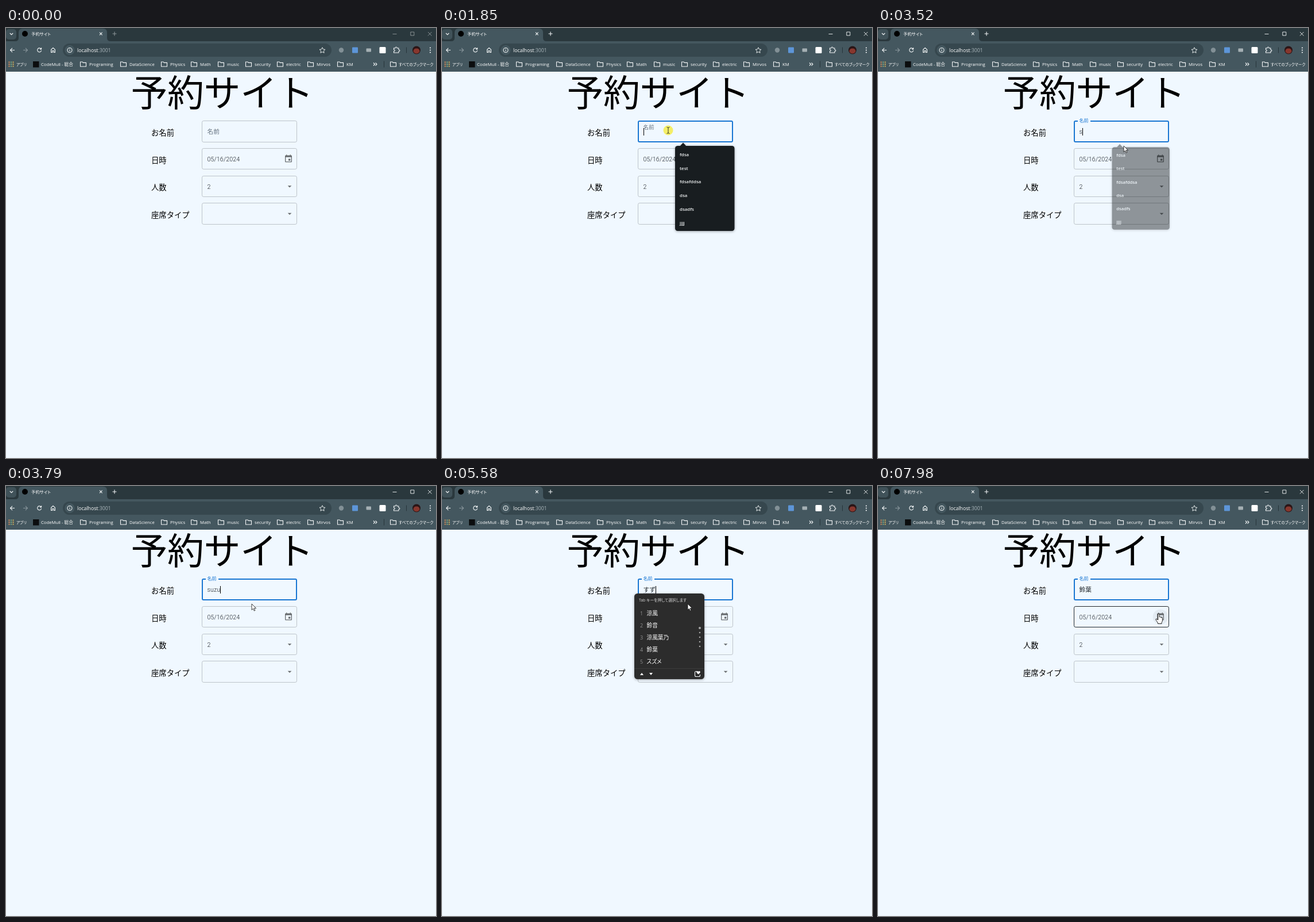
Write an HTML page that moves like this. It is 749 by 748 pixels and loops after 8 s.

```html
<!DOCTYPE html>
<html lang="ja">
<head>
<meta charset="utf-8">
<title>予約サイト</title>
<style>
html, body { margin: 0; width: 100%; height: 100%; overflow: hidden; background: #f0f8ff; }
svg { display: block; }
text { white-space: pre; font-family: "Open Sans", "Noto Sans CJK JP", "Noto Sans CJK", sans-serif; }
.bar { font-size: 7.7px; fill: #fff; font-feature-settings: "palt"; }
.jp { font-size: 6.7px; }
.icon { fill: none; stroke: #f3f6f7; stroke-width: 1.1; }
.dim { opacity: .4; }
.page { font-family: "Noto Sans CJK JP", "Noto Sans CJK", sans-serif; }
.heading { font-size: 64px; letter-spacing: -.5px; }
.caption { font-size: 13.33px; }
.value { font: 300 10.67px Roboto, "Noto Sans CJK JP", "Noto Sans CJK", sans-serif; letter-spacing: .1px; fill: #1c2227; }
.box { fill: none; stroke: #bdc4c9; }
.box.hover { stroke: #23282c; }
.focus { fill: none; stroke: #1976d2; stroke-width: 2; }
.grey { fill: #6a6e71; }
.suggest text { font-size: 7.9px; font-weight: 600; fill: #eef1f2; }
.suggest, .ime { filter: drop-shadow(0 1px 2px rgba(0, 0, 0, .35)); }
.suggest { transform-origin: 457.5px 279px; }
.ime text { font-size: 9.7px; fill: #fff; font-feature-settings: "palt"; }
.ime .hint { font-size: 6.85px; fill: #d8d8d8; }
.ime .num { fill: #8f8f8f; font-size: 9px; }
</style>
</head>
<body>
<svg id="stage" width="749" height="748" viewBox="0 0 749 748">
  <rect width="749" height="23" fill="#2a383d"/>
  <rect y="23" width="749" height="53" fill="#44575f"/>

  <!-- tab strip -->
  <rect x="0" y="2" width="18" height="18" rx="5" fill="#405259"/>
  <path class="icon" d="M6.8 9l2.7 2.7L12.2 9"/>
  <path d="M16 23q6 0 6-6V8q0-7 7-7H169q7 0 7 7v9q0 6 6 6z" fill="#44575f"/>
  <circle cx="33" cy="10" r="5" fill="#000"/>
  <text class="bar" x="44" y="13.2" style="font-size:7.4px">予約サイト</text>
  <path class="icon" d="M163 7.7l4.6 4.6m0-4.6l-4.6 4.6"/>
  <g id="controls" class="icon">
    <path d="M185.5 10h7M189 6.500v7"/>
    <path d="M673.5 10.5h7M704.8 7h6v6h-6zM735 7l6.5 6.5m0-6.5L735 13.5" stroke-width=".9"/>
  </g>

  <!-- toolbar -->
  <g class="icon">
    <path d="M15 38.5H7.5m3.6-3.6l-3.6 3.6 3.6 3.6"/>
    <path class="dim" d="M30 38.5h7.5m-3.6-3.6l3.6 3.6-3.6 3.6"/>
    <path d="M61 36.3a3.5 3.5 0 1 0 .6 2.7M61.6 34.3v2.6H59"/>
    <path d="M78.6 42.5v-5l3.4-3 3.4 3v5h-2.2v-3h-2.4v3z"/>
  </g>
  <rect x="99" y="27" width="468" height="23" rx="11.5" fill="#36474e"/>
  <circle cx="111" cy="38.5" r="8.5" fill="#44575f"/>
  <g class="icon">
    <circle cx="111" cy="38.5" r="4"/>
    <path d="M111 38v2.6m0-4.6v1.1"/>
    <path d="M551 33.8l1.5 3.2 3.5.4-2.6 2.4.7 3.5-3.1-1.8-3.1 1.8.7-3.5-2.6-2.4 3.5-.4z" stroke-width=".9"/>
    <path d="M675.5 35h2.6q0-2 1.5-2t1.5 2h2.8v2.8q2 0 2 1.5t-2 1.5V43h-8.4v-2.5q1.8 0 1.8-1.4t-1.8-1.4z"/>
  </g>
  <text class="bar" x="124" y="41.6" style="font-size:8.7px">localhost<tspan fill="#aebabf">:3001</tspan></text>
  <circle cx="584" cy="38.5" r="4.2" fill="#829096"/>
  <rect x="603" y="33.5" width="10" height="10" rx="1" fill="#5d95d8"/>
  <rect x="627.5" y="35.5" width="8.5" height="6" rx="1" fill="#a5b0b4"/>
  <rect x="650.5" y="33" width="11" height="11" rx="1.5" fill="#fff"/>
  <path d="M697.5 33.5v10M658.5 57.5v11" stroke="#26343a"/>
  <circle cx="715" cy="38.5" r="7" fill="#2a1516"/>
  <path d="M709.5 41q0-5.5 5.5-5.5t5.5 5.5q-2 3.5-5.5 3.5t-5.5-3.5" fill="#87372e"/>
  <path d="M739 34.5h0m0 4h0m0 4h0" stroke="#f3f6f7" stroke-width="2.2" stroke-linecap="round"/>

  <!-- bookmarks -->
  <g id="bookmarks"></g>
  <rect x="47" y="58" width="10.5" height="10.5" fill="#0b0d0e"/>
  <text class="bar jp" x="18" y="65.7">アプリ</text>
  <text class="bar" x="61" y="66">CodeMull - 総合</text>
  <path class="icon" d="M640 60.5l2.5 2.5-2.5 2.5m3.5-5l2.5 2.5-2.5 2.5"/>
  <text class="bar jp" x="744.5" y="65.7" text-anchor="end">すべてのブックマーク</text>

  <!-- page -->
  <text class="page heading" x="217.5" y="136">予約サイト</text>
  <g id="form"></g>
  <rect id="focus" class="focus" x="342" y="162" width="164" height="36" rx="2"/>
  <circle id="halo" cx="492" cy="227.7" r="13.3" opacity=".05"/>
  <text class="value" x="350.5" y="231.8">05/16/2024</text>
  <text class="value" x="350.5" y="279.5">2</text>
  <path class="grey" transform="translate(484 219.5) scale(.667)" d="M17 12h-5v5h5zM16 1v2H8V1H6v2H5q-2 0-2 2v14q0 2 2 2h14q2 0 2-2V5q0-2-2-2h-1V1zm3 18H5V8h14z"/>
  <path class="grey" d="M490.7 274.2h6.7l-3.35 3.35zM490.7 321.7h6.7l-3.35 3.35z"/>
  <path id="notch" d="M348 162h22" stroke="#f0f8ff" stroke-width="3"/>
  <text id="label" class="page" x="350.5">名前</text>
  <text id="typed" class="value" x="350.5" y="184.2"></text>
  <path id="underline" stroke="#333"/>
  <rect id="caret" y="174" width="1" height="13"/>

  <!-- overlays -->
  <g id="suggest" class="suggest">
    <path d="M414 206l6-6.5 6 6.5z" fill="#181d20"/>
    <rect x="406" y="205" width="103.5" height="148" rx="4.5" fill="#181d20"/>
  </g>
  <g id="ime" class="ime">
    <rect x="335" y="187" width="122" height="149" rx="5.5" fill="#2c2c2c"/>
    <text class="hint" x="343" y="201">Tab キーを押して選択します</text>
    <g id="candidates"></g>
    <path d="M335 317.5h122" stroke="#3b3b3b"/>
    <path d="M345 329l3-4 3 4zM361 325h6l-3 4z" fill="#fff"/>
    <path class="icon" d="M445 322.5h-2.5q-2 0-2 2v5q0 2 2 2h5q2 0 2-2V328"/>
    <path d="M446.5 327.5q-3.5-2.5-3.2-4.2.8-2.5 3.2-.6 2.4-1.9 3.3.6.2 1.7-3.3 4.2z" fill="#fff"/>
  </g>
  <g id="pointer">
    <circle id="click" r="8.5" fill="#f4ec4c" opacity=".85"/>
    <path id="arrow" d="M0 0V10.6L2.5 8.3 4.2 12.2 5.9 11.4 4.2 7.7H7.6Z" fill="#fff" stroke="#111" stroke-width=".8"/>
    <path id="beam" d="M-2.5-5.5Q0-5.5 0-4Q0-5.5 2.5-5.5M0-4V4M-2.5 5.5Q0 5.5 0 4Q0 5.5 2.5 5.5" fill="none" stroke="#222" stroke-width=".9"/>
    <path id="hand" d="M-1.2 1.2Q0-1 1.2 1.2V6Q2.4 5 3.4 6.4Q4.6 5.8 5.2 7.2Q6.4 7 6.4 8.4V12Q6.4 14 5 15.5V17.5H-1.5V16Q-3 14-5 10.8Q-5.6 9-4 9.2L-1.2 11Z" fill="#fff" stroke="#111" stroke-width=".9"/>
  </g>
</svg>
<script>
const LOOP = 8000, STEP = 66.7, FOCUS = 1850;
const $ = id => document.getElementById(id);
const add = (id, markup) => $(id).insertAdjacentHTML('beforeend', markup);
const show = (id, on) => { $(id).style.visibility = on ? 'visible' : 'hidden'; };
const clamp = v => Math.min(1, Math.max(0, v));
const easeOut = p => 1 - (1 - p) ** 2;

// Bookmarks bar
const folder = x => `<path class="icon" stroke-width=".9" d="M${x + .5} 59h3.6l1.3 1.4h5.1v6.6h-10z"/>`;
const folders = [[129, 'Programing'], [199, 'DataScience'], [270, 'Physics'], [322, 'Math'],
  [369, 'music'], [417, 'security'], [472, 'electric'], [525, 'Mirvos'], [577, 'KM']];
for (const [x, name] of folders) add('bookmarks', `${folder(x)}<text class="bar" x="${x + 16}" y="66">${name}</text>`);
add('bookmarks', folder(669));
const appColors = ['#e0915a', '#7fb08a', '#d8b25c'];
for (let i = 0; i < 9; i++) {
  add('bookmarks', `<rect x="${4.5 + i % 3 * 3.5}" y="${58.5 + Math.floor(i / 3) * 3.5}" width="2" height="2" fill="${appColors[i % 3]}"/>`);
}

// Form: field edges snap to whole pixels
const PITCH = 47.67;
const captions = ['お名前', '日時', '人数', '座席タイプ'];
const fields = captions.map((_, i) => ({ top: Math.round(161.33 + i * PITCH), bottom: Math.round(198.67 + i * PITCH) }));
fields.forEach(({ top, bottom }, i) => add('form',
  `<text class="page caption" x="253" y="${187 + i * PITCH}">${captions[i]}</text>
   <rect id="box${i}" class="box" x="341.5" y="${top + .5}" width="165" height="${bottom - top - 1}" rx="2.7"/>`));

// Popups
['fdsa', 'test', 'fdsafddsa', 'dsa', 'dsadfs', 'jjjj'].forEach((word, i) =>
  add('suggest', `<text x="414" y="${222.7 + i * 23.8}">${word}</text>`));
const earlyWords = ['すぐ', '少し', '素直な心', '砂', 'スイカ'];
const lateWords = ['涼風', '鈴音', '涼風葉乃', '鈴葉', 'スズメ'];
lateWords.forEach((_, i) => {
  const y = 224.5 + i * 21.1;
  add('candidates', `<text class="num" x="345" y="${y}">${i + 1}</text><text id="word${i}" x="356.5" y="${y}"></text>
    <circle cx="449" cy="${247 + i * 8}" r="${i ? 1.3 : 2}" fill="#a5a5a5"/>`);
});

// [time, text, underline dash]
const DOTS = '1.2 1.2', SOLID = 'none';
const typing = [[0, ''], [3460, 's'], [3590, 'su'], [3660, 'suz'], [3790, 'suzu'], [4390, 'suz'], [4450, 'su'],
  [4590, 's'], [4790, ''], [5180, 's', DOTS], [5320, 'す', DOTS], [5520, 'すz', DOTS], [5580, 'すず', DOTS],
  [5980, 'すずk', DOTS], [6120, 'すずき', DOTS], [6190, '鈴葉', SOLID], [7120, '鈴葉']];
const caretOff = [[0, FOCUS], [2380, 2920], [4320, 4850], [6850, 7120], [7650, LOOP]];

// [time, x, y]
const path = [[510, 734, 735], [1180, 412, 250], [1270, 412, 250], [1450, 394, 178], [1960, 394, 178],
  [2380, 428, 205], [7060, 428, 205], [7450, 489, 227], [7600, 489, 227], [7720, 489, 232], [7960, 489, 222]];

function pointerAt(time) {
  const next = path.findIndex(p => p[0] > time);
  if (next < 0) return path.at(-1).slice(1);
  if (next === 0) return path[0].slice(1);
  const [t0, x0, y0] = path[next - 1], [t1, x1, y1] = path[next];
  const k = easeOut((time - t0) / (t1 - t0));
  return [x0 + (x1 - x0) * k, y0 + (y1 - y0) * k];
}

function drawPointer(t) {
  const [x, y] = pointerAt(510 + Math.floor((t - 510) / STEP + .15) * STEP);
  const row = x > 341 && x < 507 ? fields.findIndex(f => y >= f.top && y < f.bottom) : -1;
  const onIcon = row === 1 && x > 479;
  const shape = row < 0 ? 'arrow' : row > 1 || onIcon ? 'hand' : 'beam';
  const visible = t >= 510;
  $('pointer').setAttribute('transform', `translate(${x} ${y})`);
  for (const id of ['arrow', 'beam', 'hand']) show(id, visible && id === shape);
  show('click', t >= FOCUS && t < 1985);
  show('halo', visible && onIcon);
  fields.forEach((_, i) => $('box' + i).classList.toggle('hover', visible && i === row));
}

function drawFocus(t) {
  const k = t < FOCUS ? 0 : easeOut(clamp((t - 1805) / 200));
  $('label').setAttribute('y', 183.7 - 19.4 * k);
  $('label').style.fontSize = 10.67 - 2.67 * k + 'px';
  $('label').style.fill = k > .6 ? '#1976d2' : '#667380';
  show('notch', k > .6);
  show('focus', t >= FOCUS);
  show('box0', t < FOCUS);
}

function drawTyping(t) {
  const [, text, dash] = typing.findLast(s => s[0] <= t);
  if ($('typed').textContent !== text) $('typed').textContent = text;
  const end = 350.5 + (text ? $('typed').getComputedTextLength() : 0);
  $('caret').setAttribute('x', Math.round(end));
  show('caret', !caretOff.some(([from, to]) => t >= from && t < to));
  $('underline').setAttribute('d', `M351 187.2H${end}`);
  $('underline').setAttribute('stroke-dasharray', dash || SOLID);
  show('underline', dash);
}

function drawPopups(t) {
  const fade = clamp((t - 3440) / 148);
  $('suggest').style.opacity = 1 - fade;
  $('suggest').style.transform = `scale(${1 - .055 * fade})`;
  show('suggest', t >= FOCUS && fade < 1);
  (t < 5580 ? earlyWords : lateWords).forEach((word, i) => { $('word' + i).textContent = word; });
  show('ime', t >= 5380 && t < 6190);
}

const start = performance.now();
function frame() {
  const t = (performance.now() - start) % LOOP;
  $('controls').style.opacity = t < FOCUS ? .5 : 1;
  drawFocus(t);
  drawTyping(t);
  drawPopups(t);
  drawPointer(t);
  requestAnimationFrame(frame);
}
frame();
</script>
</body>
</html>
```
